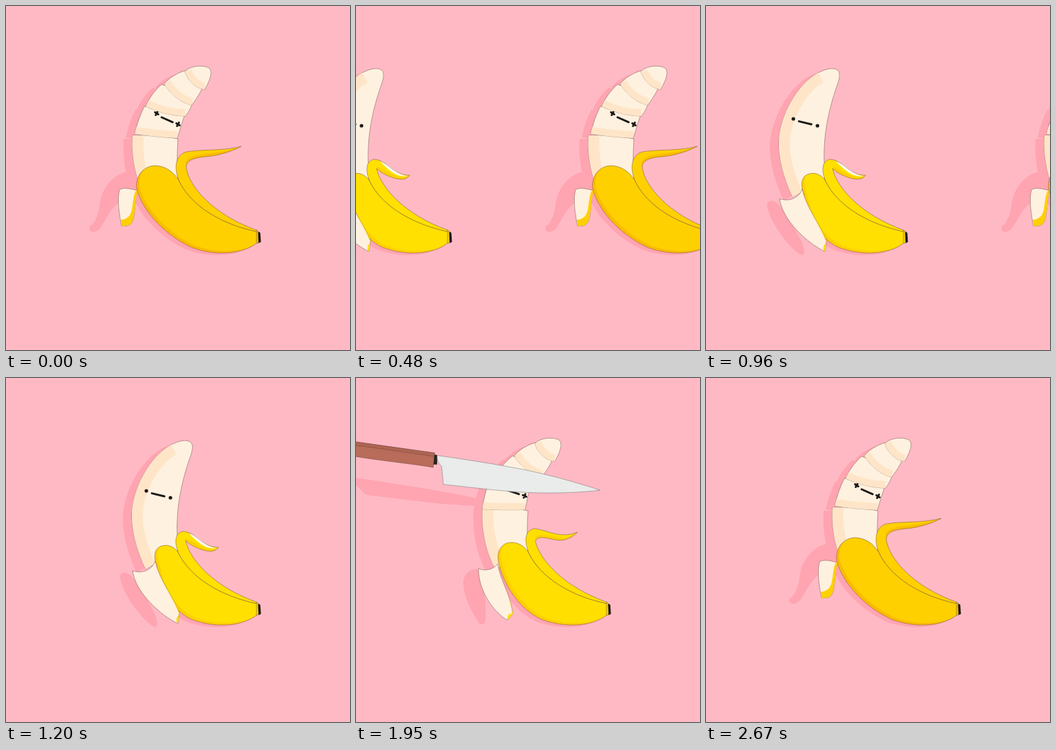
An HTML page with a canvas for the animation above (2.7 s loop, 500 by 500 pixels).

```html
<!DOCTYPE html>
<html lang="en">
<head>
<meta charset="utf-8">
<title>Sliced banana</title>
<style>
html, body { margin: 0; width: 100%; height: 100%; overflow: hidden; background: #ffb9c4; }
canvas { display: block; width: 500px; height: 500px; }
</style>
</head>
<body>
<canvas id="stage" width="500" height="500"></canvas>
<script>
const ctx = document.getElementById('stage').getContext('2d');
const LOOP = 2700, STEP = 30, SLIDE = 1200, GAP = 385;
const PINK = '#ffb9c4', SHADE = '#ffa4b1', CREAM = '#fff1df', BEIGE = '#ffe5c8', INK = '#1d1919', LINE = '#6f5048';
const THIN = 0.5;

const clamp = v => Math.max(0, Math.min(1, v));
const lerp = (a, b, p) => a + (b - a) * p;

// Blend path strings that share a structure
function mix(a, b, p) {
  const ends = b.match(/-?[\d.]+/g);
  let i = 0;
  return a.replace(/-?[\d.]+/g, n => lerp(+n, +ends[i++], p).toFixed(2));
}

const MID = 0.385;
function pose(set, p) {
  if (set.length === 2) return new Path2D(mix(set[0], set[1], p));
  return new Path2D(p < MID ? mix(set[0], set[1], p / MID) : mix(set[1], set[2], (p - MID) / (1 - MID)));
}

const BODY = [
  'M219 273C213 258 217 246 227 244C237 241 247 247 251 255C268 290 312 317 365 328L365 344C345 361 305 364 270 351C240 338 224 300 219 273Z',
  'M190 266C188 248 198 234 215 232C232 232 243 241 251 253C268 290 312 317 365 328L365 344C345 361 305 364 270 351C235 335 200 302 190 266Z'
];
const ARM = [
  'M365 328C312 317 268 290 251 255C244 238 246 226 256 223C275 222 285 247 309 246C303 254 294 252 286 250C274 246 265 241 261 236C266 262 300 303 365 326Z',
  'M365 328C312 317 268 290 251 254C244 236 246 222 258 219C275 219 295 235 322 224C310 236 298 237 288 235C272 231 262 230 261 238C266 262 300 303 365 326Z',
  'M365 328C312 317 268 290 251 253C244 235 246 217 262 212C285 208 315 211 342 204C325 213 305 218 290 219C272 221 262 224 262 235C266 262 300 303 365 326Z'
];
const UNDER = [
  'M309 246C303 254 294 252 286 250C274 246 265 241 261 236C260 231 270 237 286 246C296 250 303 250 309 246Z',
  'M322 224C310 236 298 237 288 235C272 231 262 230 261 238C257 226 272 227 288 231C300 234 310 232 322 224Z',
  'M342 204C325 213 305 218 290 219C272 221 262 224 262 235C258 222 268 218 290 215C310 213 325 210 342 204Z'
];
const FLAP = [
  'M184 280C196 285 212 280 217 266C222 292 243 318 252 341L250 357C225 345 188 312 184 280Z',
  'M178 277C186 281 200 279 206 270C210 296 224 312 228 343L220 352C200 340 178 310 178 277Z',
  'M165 267C172 263 182 266 190 268C186 295 188 315 178 319L168 320C165 305 161 282 165 267Z'
];
const FLAP_SKIN = [
  'M217 266C222 292 243 318 252 341L250 357C246 354 247 348 252 344C243 318 222 292 217 266Z',
  'M207 272C210 296 224 312 228 343L220 352C219 347 222 342 227 342C224 312 210 296 207 272Z',
  'M191 268C186 295 188 315 178 319L168 320C168 316 167 313 167 311C190 308 180 285 189 268Z'
];
const FLAP_SHADE = [
  'M184 290C172 278 165 284 166 290C168 312 200 355 216 362C222 362 220 354 217 345C208 325 195 305 184 290Z',
  'M178 278C165 276 155 287 156 300C158 325 172 345 180 358C188 360 190 350 188 340C190 325 185 300 178 278Z',
  'M178 240C150 246 137 272 136 290C134 305 128 318 121 321C120 330 130 330 136 324C150 305 152 285 190 272Z'
];

const flesh = (outline, band, width) => ({ shape: new Path2D(outline), band: new Path2D(band), width });
const WHOLE = flesh(
  'M203 278C190 250 182 222 183 195C185 160 208 115 240 97C252 91 262 89 268 93C273 97 271 105 268 114C258 142 250 175 249 205C248 218 249 230 250 250Z',
  'M203 278C190 250 182 222 183 195C185 160 208 115 240 97', 32);
const BASE = flesh(
  'M184 188C182 215 187 250 203 278L250 252C248 230 249 210 250 193C230 189 205 187 184 188Z',
  'M184 188C182 215 187 250 203 278', 32);

// Slices: cut time, settle time, pivot, starting shift and tilt, mid-flight tilt
const slice = (t, span, x, y, dx, dy, tilt, spin, outline, band) =>
  ({ t, span, x, y, dx, dy, tilt, spin, ...flesh(outline, band, 20) });
const SLICES = [
  slice(1400, 400, 280, 102, -16, 8, -14, 24,
    'M260 95C268 87 285 85 295 90C301 95 297 107 289 121C278 121 264 109 260 95Z',
    'M289 121C278 121 264 109 260 95'),
  slice(1600, 280, 258, 117, -14, 6, -14, 10,
    'M260 94C247 98 237 105 230 113C238 127 254 141 270 144C279 132 283 125 286 117C277 108 268 101 260 94Z',
    'M230 113C238 127 254 141 270 144'),
  slice(1755, 260, 238, 137, -12, 5, -12, 6,
    'M226 114C214 125 207 136 203 146C218 153 240 160 261 160C267 152 269 147 271 140C260 128 245 119 226 114Z',
    'M203 146C218 153 240 160 261 160'),
  slice(1890, 250, 222, 168, -12, 4, -11, 0,
    'M201 146C195 158 190 172 187 186C208 189 230 191 249 192C253 180 256 168 260 158C240 150 220 147 201 146Z',
    'M187 186C208 189 230 191 249 192')
];
// Cut edges on the uncut flesh, as y at x=180 and x=290
const EDGES = [[51, 146], [104, 152], [147, 177]];

function inSlice(s, t, draw) {
  const u = clamp((t - s.t) / s.span), left = (1 - u) ** 3;
  ctx.save();
  ctx.translate(s.x + s.dx * left, s.y + s.dy * left);
  ctx.rotate((s.tilt * left + s.spin * Math.sin(Math.PI * u)) * Math.PI / 180);
  ctx.translate(-s.x, -s.y);
  draw();
  ctx.restore();
}

function outline(path, color = LINE) {
  ctx.strokeStyle = color;
  ctx.lineWidth = THIN;
  ctx.stroke(path);
}

function fill(path, color, line) {
  ctx.fillStyle = color;
  ctx.fill(path);
  if (line) outline(path, line);
}

function drawFlesh(f, shadow) {
  if (shadow) return fill(f.shape, SHADE);
  fill(f.shape, CREAM, LINE);
  ctx.save();
  ctx.clip(f.shape);
  ctx.strokeStyle = BEIGE;
  ctx.lineWidth = f.width;
  ctx.stroke(f.band);
  ctx.restore();
}

function face(x1, y1, x2, y2, dead) {
  ctx.strokeStyle = ctx.fillStyle = INK;
  ctx.lineCap = 'round';
  ctx.lineWidth = 2.9;
  ctx.beginPath();
  ctx.moveTo(lerp(x1, x2, 0.23), lerp(y1, y2, 0.36));
  ctx.lineTo(lerp(x1, x2, 0.75), lerp(y1, y2, 0.8));
  ctx.stroke();
  for (const [x, y] of [[x1, y1], [x2, y2]]) {
    ctx.beginPath();
    if (dead) {
      ctx.moveTo(x - 2.4, y - 1.4); ctx.lineTo(x + 2.4, y + 1.4);
      ctx.moveTo(x + 1.4, y - 2.4); ctx.lineTo(x - 1.4, y + 2.4);
      ctx.stroke();
    } else {
      ctx.arc(x, y, 2.6, 0, 7);
      ctx.fill();
    }
  }
  ctx.lineCap = 'butt';
}

function drawFruit(t, shadow) {
  const cuts = SLICES.filter(s => t >= s.t).length;
  if (cuts === 4) drawFlesh(BASE, shadow);
  else {
    ctx.save();
    if (cuts) {
      const [l, r] = EDGES[cuts - 1], k = (r - l) / 110;
      ctx.beginPath();
      ctx.moveTo(100, l - 80 * k);
      ctx.lineTo(400, r + 110 * k);
      ctx.lineTo(400, 400);
      ctx.lineTo(100, 400);
      ctx.clip();
    }
    drawFlesh(WHOLE, shadow);
    ctx.restore();
    if (!shadow) face(204, 164, 239, 174, false);
  }
  for (let i = cuts - 1; i >= 0; i--) {
    inSlice(SLICES[i], t, () => {
      drawFlesh(SLICES[i], shadow);
      if (i === 3 && !shadow) face(219, 156, 250, 172, true);
    });
  }
}

function drawPeel(p, body) {
  const ripe = clamp((p - 0.35) / 0.65);
  const skin = `rgb(255,${224 - 16 * ripe},0)`;
  const dark = `rgb(${255 - 5 * ripe},${207 - 20 * ripe},0)`;
  fill(body, dark);
  ctx.save();
  ctx.clip(body);
  ctx.translate(4, -3);
  fill(body, skin);
  ctx.restore();
  outline(body);

  fill(pose(FLAP, p), CREAM, LINE);
  fill(pose(FLAP_SKIN, p), skin);

  const arm = pose(ARM, p);
  fill(arm, skin);
  fill(pose(UNDER, p), dark);
  ctx.globalAlpha = clamp(1.5 - 5 * p);
  fill(new Path2D('M266 226C282 230 290 246 306 247C292 250 280 240 266 226Z'), '#fffaf0');
  ctx.globalAlpha = 1;
  outline(arm);

  fill(new Path2D('M364 326L367 328L367.5 344L364 345Z'), dark, LINE);
  fill(new Path2D('M366.5 328L369.5 329.5L370.5 343L367 344.5Z'), '#111');
}

function banana(t, x, under) {
  const p = clamp((t - 1500) / 1170), body = pose(BODY, p);
  ctx.save();
  ctx.translate(x, 0);
  fill(pose(FLAP_SHADE, p), SHADE);
  ctx.save();
  ctx.translate(-8, 3);
  fill(body, SHADE);
  ctx.translate(-5, 2);
  drawFruit(t, true);
  ctx.restore();
  if (under) under();
  drawFruit(t, false);
  drawPeel(p, body);
  ctx.restore();
}

// Knife, with its tip at the origin
const BLADE = new Path2D('M-242 -17C-200 -17 -140 -16 -105 -13.5C-60 -10 -30 -5 0 0C-30 8 -65 14 -103 18C-145 22 -190 22 -227 23.5L-233 -2C-237 -5 -240 -8 -242 -17Z');
const BOLSTER = new Path2D('M-248 -18L-242 -17.5L-240 -4L-247 -3Z');
const HANDLE = new Path2D('M-246 -20L-388 -20C-401 -17 -402 -2 -386 0C-340 3 -290 0 -245 1Z');
const GRIP = new Path2D('M-246 -20L-388 -20C-394 -19 -397 -17 -397 -14C-350 -16 -300 -15 -246 -15Z');

// time, tip x, tip y, angle, height
const MOVES = [
  [1200, 300, -70, 48, 3], [1400, 350, 190, 38, 1], [1500, 374, 150, 31, 2],
  [1590, 382, 200, 25, 1], [1665, 376, 150, 20, 2.2], [1755, 368, 196, 14, 1],
  [1820, 360, 150, 10, 2.2], [1890, 355, 194, 6, 1], [1950, 355, 163, 8, 3.4],
  [2190, 290, 30, 32, 2.6], [2280, 250, -75, 40, 2.6]
];

function knifeAt(t) {
  const i = MOVES.findIndex(m => m[0] > t);
  if (i < 1) return null;
  const a = MOVES[i - 1], b = MOVES[i];
  const u = (t - a[0]) / (b[0] - a[0]), e = (1 - Math.cos(Math.PI * u)) / 2;
  return a.map((v, k) => lerp(v, b[k], e));
}

function knife([, x, y, angle, height], shadow) {
  ctx.save();
  ctx.translate(x - (shadow ? 37 * height : 0), y + (shadow ? 7 * height : 0));
  ctx.rotate(angle * Math.PI / 180);
  if (shadow) {
    // The cast shape leans and flattens
    ctx.transform(1, 0, 0.5, 0.55, 0, 0);
    [BLADE, BOLSTER, HANDLE].forEach(path => fill(path, SHADE));
  } else {
    fill(BLADE, '#e9eceb', '#74706f');
    fill(BOLSTER, '#252222');
    fill(HANDLE, '#b86c59', '#70483f');
    fill(GRIP, '#b06452', '#70483f');
  }
  ctx.restore();
}

function render(t) {
  ctx.fillStyle = PINK;
  ctx.fillRect(0, 0, 500, 500);
  if (t < SLIDE) {
    const x = GAP * t / SLIDE;
    banana(0, x - GAP);
    banana(LOOP, x);
    return;
  }
  const k = knifeAt(t);
  banana(t, 0, k && (() => knife(k, true)));
  if (k) knife(k, false);
}

const start = performance.now();
function tick() {
  const t = (performance.now() - start) % LOOP;
  render(t - t % STEP);
  requestAnimationFrame(tick);
}
tick();
</script>
</body>
</html>
```
